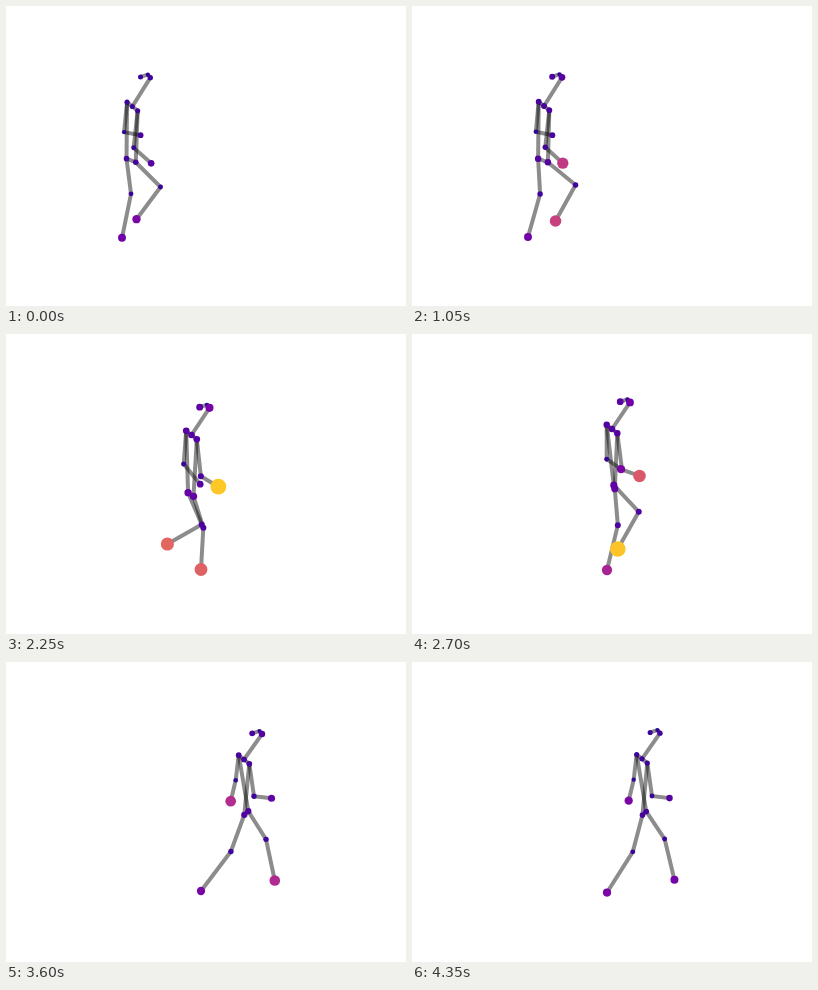
An HTML page that plays this animation: 400x300 px, repeating every 4.5 s.

```html
<!DOCTYPE html>
<html lang="en">
<head>
<meta charset="utf-8">
<title>Walking figure</title>
<style>
  html, body { margin: 0; width: 100%; height: 100%; overflow: hidden; background: #fff; }
  svg { display: block; width: 100%; height: 100%; }
  line { stroke: #000; stroke-opacity: .45; stroke-width: 4; }
</style>
</head>
<body>
<svg viewBox="0 0 400 300"><g id="bones"></g><g id="dots"></g></svg>
<script>
const STEP = 150, STEPS = 30;

const clamp = u => Math.min(Math.max(u, 0), 1);
const lerp = (a, b, u) => a + (b - a) * u;
const ease = u => { u = clamp(u); return u * u * (3 - 2 * u); };
const bump = (t, centre, width) => Math.exp(-(((t - centre) / width) ** 2));
const shift = (p, dx, dy) => ({ x: p.x + dx, y: p.y + dy });

// Smooth curve through a few values; runs on straight past the last one.
const KEYS = [4, 7, 11, 15, 18, 24];
function through(vals, t) {
  const last = KEYS.length - 1;
  const slope = k => {
    const a = Math.max(k - 1, 0), b = Math.min(k + 1, last);
    return (vals[b] - vals[a]) / (KEYS[b] - KEYS[a]);
  };
  if (t > KEYS[last]) return vals[last] + slope(last) * (t - KEYS[last]);
  let i = 0;
  while (t > KEYS[i + 1]) i++;
  const h = KEYS[i + 1] - KEYS[i], u = (t - KEYS[i]) / h, v = 1 - u;
  return v * v * ((1 + 2 * u) * vals[i] + u * h * slope(i)) +
         u * u * ((3 - 2 * u) * vals[i + 1] - v * h * slope(i + 1));
}

const NECK = { x: [109, 132, 161, 185.5, 200, 238], y: [104, 100, 104, 101, 95, 97.5] };
const PELVIS = { x: [105, 131, 155.3, 184.8, 202.3, 240.3], y: [156, 154.5, 159.5, 160.5, 153, 151] };

// Each foot makes one stride: where and when it leaves, how long it swings.
const STRIDE = 154;
const FOOT_L = { from: 116, start: 9.5, swing: 15.3, y: [234, 231, 226, 210, 215, 218.5] };
const FOOT_R = { from: 41, start: -0.9, swing: 12.9, y: [211, 215, 233.5, 235.5, 236, 229] };

// The walk eases into a reversal near both ends of the loop.
function phaseAt(n) {
  if (n < 5) return 4 + (n - 3) ** 2 / 4;
  if (n > 24) return 25 - (n - 26) ** 2 / 4;
  return n;
}

const track = (path, p) => ({ x: through(path.x, p), y: through(path.y, p) });

const ankle = (foot, p) => ({
  x: foot.from + STRIDE * ease((p - foot.start) / foot.swing),
  y: through(foot.y, p)
});

// The knee bends forward when hip and ankle come close.
function knee(hip, foot) {
  const dx = foot.x - hip.x, dy = foot.y - hip.y, d = Math.hypot(dx, dy);
  const bend = (6.5 + 18 * ease((74 - d) / 12)) / d;
  return shift(hip, 0.44 * dx + bend * dy, 0.44 * dy - bend * dx);
}

function poseAt(p) {
  const neck = track(NECK, p), pelvis = track(PELVIS, p);

  const earR = shift(neck, 18, 0.19 * p - 30);
  const nose = shift(earR, -2.5, -3);
  const earL = shift(earR, -9.8, -0.7);

  const shoulderL = shift(neck, -5.3, -4.3), shoulderR = shift(neck, 5.3, 4.3);
  const elbowL = shift(shoulderL,
    -3 + 10 * bump(p, 11, 2) + 3 * bump(p, 18, 2),
    30 + 5 * bump(p, 17, 3) - 5 * ease((p - 18) / 5));
  const elbowR = shift(shoulderR,
    lerp(-4, 4.7, ease((p - 10) / 6)),
    lerp(37, 32.5, ease((p - 16) / 8)));
  const wristL = shift(elbowL,
    lerp(16.5, -5, ease((p - 17) / 5)),
    3 + 18 * ease((p - 6) / 10) - 11 * bump(p, 18, 1.5));
  const wristR = shift(elbowR, 17.5, 9 + 7 * Math.cos((p - 8) * Math.PI / 16));

  const twist = 1.6 + 3.6 * Math.cos((p - 9) * Math.PI / 15);
  const hipL = shift(pelvis, -twist, -1.8), hipR = shift(pelvis, twist, 1.8);
  const ankleL = ankle(FOOT_L, p), ankleR = ankle(FOOT_R, p);
  const kneeL = knee(hipL, ankleL), kneeR = knee(hipR, ankleR);

  return { earL, nose, earR, neck, shoulderL, shoulderR, elbowL, elbowR, wristL, wristR,
           hipL, hipR, kneeL, kneeR, ankleL, ankleR };
}

// Dot weight: resting value, gain, and when the gain peaks.
const weight = (base, gain, centre = 15, width = 10) => n => base + gain * bump(n, centre, width);
const torso = weight(.085, .07), hip = weight(.1, .09), joint = weight(.08, .05);
const weights = {
  earL: weight(.08, .09), nose: weight(.06, .01), earR: weight(.08, .15),
  neck: torso, shoulderL: torso, shoulderR: torso,
  elbowL: weight(.06, .03), elbowR: joint,
  wristL: weight(.12, .29, 23.5, 6), wristR: weight(.15, .82, 13, 6),
  hipL: hip, hipR: hip, kneeL: joint, kneeR: joint,
  ankleL: weight(.22, .66, 18.5, 4.8), ankleR: weight(.24, .5, 11.7, 5.5)
};

const PLASMA = ["#0d0887", "#46039f", "#7201a8", "#9c179e", "#bd3786",
                "#d8576b", "#ed7953", "#fb9f3a", "#fdca26", "#f0f921"]
  .map(c => [1, 3, 5].map(i => parseInt(c.slice(i, i + 2), 16)));

function plasma(v) {
  const p = clamp(v) * 9, i = Math.min(Math.floor(p), 8);
  return `rgb(${PLASMA[i].map((c, k) => Math.round(lerp(c, PLASMA[i + 1][k], p - i)))})`;
}

const chains = [
  "neck earR nose earL",
  "shoulderL neck shoulderR",
  "shoulderL elbowL wristL", "shoulderR elbowR wristR",
  "shoulderL hipL kneeL ankleL", "shoulderR hipR kneeR ankleR",
  "hipL hipR"
];

function add(tag, parent) {
  const el = document.createElementNS("http://www.w3.org/2000/svg", tag);
  return document.getElementById(parent).appendChild(el);
}

function set(el, attrs) {
  for (const k in attrs) el.setAttribute(k, attrs[k]);
}

const bones = chains.flatMap(chain => {
  const names = chain.split(" ");
  return names.slice(1).map((to, i) => ({ from: names[i], to, el: add("line", "bones") }));
});
const dots = Object.keys(weights).map(name => ({ name, el: add("circle", "dots") }));

function draw(n) {
  const pose = poseAt(phaseAt(n));
  for (const { from, to, el } of bones) {
    const a = pose[from], b = pose[to];
    set(el, { x1: a.x, y1: a.y, x2: b.x, y2: b.y });
  }
  for (const { name, el } of dots) {
    const { x, y } = pose[name], w = weights[name](n);
    set(el, { cx: x, cy: y, r: 8.4 * Math.sqrt(w), fill: plasma(w) });
  }
}

const start = performance.now();
function tick() {
  draw(Math.floor((performance.now() - start) / STEP) % STEPS);
  requestAnimationFrame(tick);
}
tick();
</script>
</body>
</html>
```
